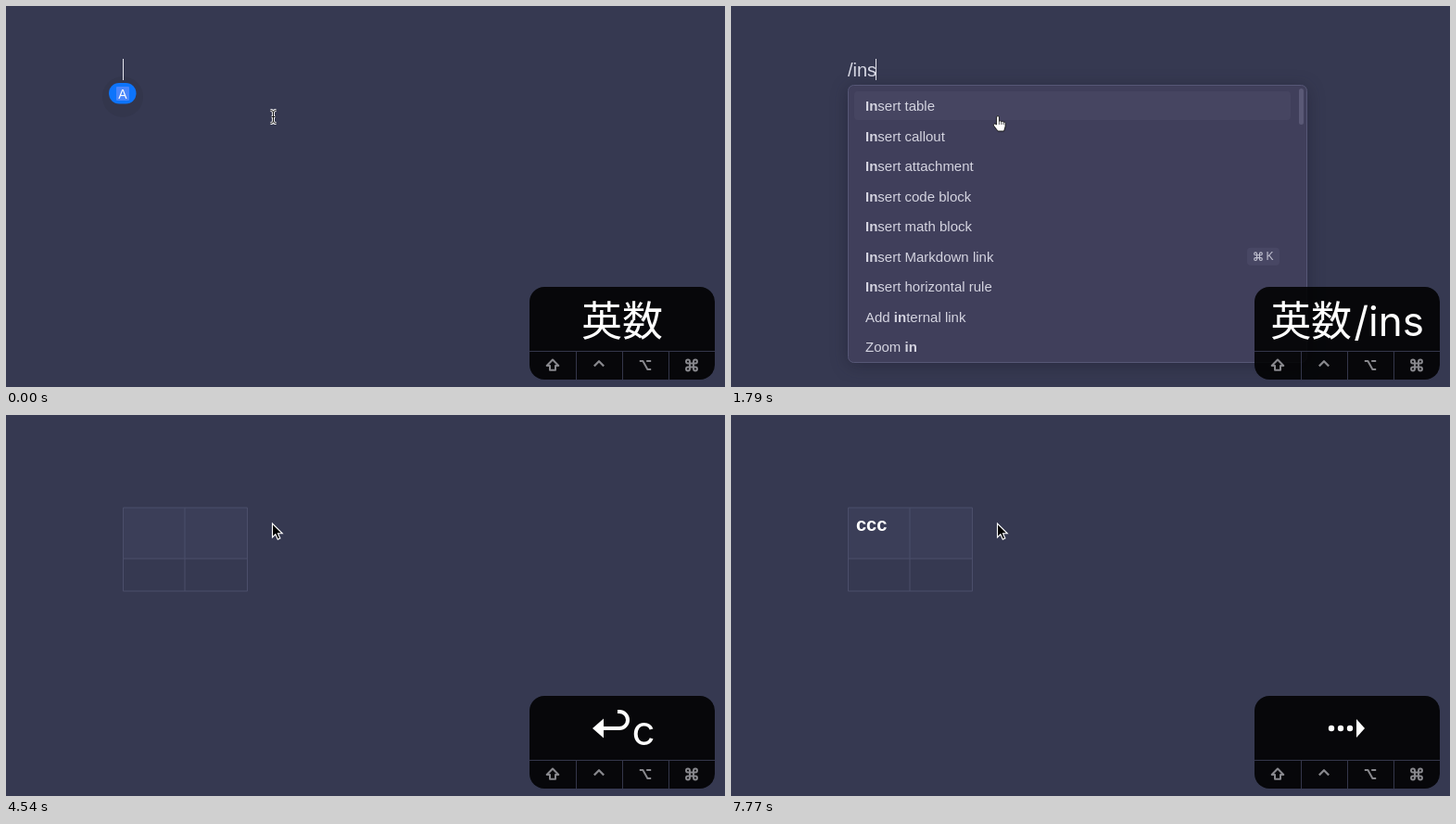
Write an HTML page that moves like this. It is 776 by 411 pixels and loops after 8000 ms.

```html
<!DOCTYPE html>
<html lang="en">
<head>
<meta charset="utf-8">
<title>Slash command menu</title>
<style>
  html, body { margin: 0; width: 100%; height: 100%; overflow: hidden; background: #363951; }
  svg { display: block; width: 100vw; height: 100vh; }
  text { font-family: "Liberation Sans", Arial, sans-serif; white-space: pre; }
  .editor { font-size: 20px; fill: #d9dae6; }
  .head { font-size: 20px; font-weight: 700; fill: #fff; }
  .item { font-size: 15px; fill: #d4d4e0; }
  .item tspan { font-weight: 700; }
  .hotkey { font-size: 12px; fill: #c3c3d2; }
  .keys { font: 44px Inter, "Noto Sans CJK JP", "Noto Sans CJK", sans-serif; fill: #fff; }
  .panel { filter: drop-shadow(0 3px 9px rgba(20, 20, 40, .38)); }
  .line { fill: none; stroke-linejoin: round; }
</style>
</head>
<body>
<svg id="stage" viewBox="0 0 776 411"></svg>
<script>
const LOOP = 8000;
const stage = document.getElementById('stage');

const ICON = {
  shift: 'M0-6.5L6.3 0H3V4.8H-3V0H-6.3Z',
  control: 'M-5.2 1L0-4.2 5.2 1',
  option: 'M-6.2-4.5H-2.6L2.4 4.5H6.2M1.2-4.5H6.2',
  command: 'M-2-2V-4a2 2 0 1 0-2 2H4a2 2 0 1 0-2-2V4a2 2 0 1 0 2-2H-4a2 2 0 1 0 2 2z',
  pin: 'M-4.2-6.5H4.2M-2.6-6.5V-1.4L-5 2.5H5L2.6-1.4V-6.5M0 2.5V7',
  beam: 'M-3-7Q0-7 0-4.5V4.5Q0 7-3 7M3-7Q0-7 0-4.5M0 4.5Q0 7 3 7M-1.8 0H1.8',
  hand: 'M4.6 10V2a1.4 1.4 0 0 1 2.8 0V6.5a1.3 1.3 0 0 1 2.4.4 1.3 1.3 0 0 1 2.3.6 1.2 1.2 0 0 1 2 1V12L12.6 17H6L1.5 11a1.3 1.3 0 0 1 2-1.6z',
  arrow: 'M0 0V15L3.4 11.8 5.8 17.2 8.4 16 6 10.8H10.8z'
};

const allItems = ['Export to PDF...', 'Templater: Open Insert Template modal', 'Templates: Insert template',
  'Git: Stage current file', 'Git: Commit staged with specific message', 'Templates: Insert current time',
  'Add cursor above', 'Add cursor below', 'Add embed'];
const inserts = ['table', 'callout', 'attachment', 'code block', 'math block', 'Markdown link', 'horizontal rule']
  .map(name => 'Insert ' + name);
const loose = [...inserts, 'Add internal link', 'Zoom in'];
const strict = [...inserts, 'Templates: Insert template', 'Templates: Insert current time'];

const MENU = {
  all: { query: '', right: 626, items: allItems, pins: [0, 1, 2, 3, 4, 5], hotkey: [1, 'option', 'E'] },
  i: { query: 'i', right: 619, items: loose, pins: [], hotkey: [5, 'command', 'K'] },
  in: { query: 'in', right: 622, items: loose, pins: [], hotkey: [5, 'command', 'K'] },
  ins: { query: 'ins', right: 626, items: strict, pins: [7, 8], hotkey: [5, 'command', 'K'] }
};

// Each step changes part of the state; caret is [x, top] or null.
const TIMELINE = [
  [0, { text: '', caret: [126, 57], badge: true, keys: '英数', pointer: 'beam', menu: null, table: null, ctrl: false }],
  [120, { badge: false }],
  [360, { caret: null }],
  [600, { text: '/', caret: [131, 57], keys: '英数/' }],
  [720, { menu: 'all', pointer: 'hand' }],
  [1080, { caret: null }],
  [1440, { text: '/i', caret: [136, 57], keys: '英数/i' }],
  [1560, { text: '/in', caret: [146.6, 57], keys: '英数/in', menu: 'i' }],
  [1670, { menu: 'in' }],
  [1790, { text: '/ins', caret: [156, 57], keys: '英数/ins' }],
  [1910, { menu: 'ins' }],
  [2270, { caret: null }],
  [2390, { keys: '', ctrl: true }],
  [2630, { keys: '↩', ctrl: false }],
  [2750, { text: '', menu: null, table: '', caret: [135, 106], pointer: 'arrow' }],
  [3230, { caret: null }],
  [3710, { caret: [135, 106] }],
  [4190, { caret: null }],
  [4540, { keys: '↩c' }],
  [4660, { table: 'c', caret: [146, 106] }],
  [4780, { table: 'cc', caret: [157, 106], keys: '↩cc' }],
  [5020, { table: 'ccc', caret: [168, 106], keys: '↩ccc' }],
  [5380, { keys: '', ctrl: true }],
  [5490, { caret: null }],
  [5970, { caret: [168, 106] }],
  [6090, { keys: '⇥', ctrl: false }],
  [6210, { caret: [201.5, 106] }],
  [6690, { caret: null }],
  [7170, { caret: [201.5, 106] }],
  [7770, { caret: null }]
];

const rect = (x, y, w, h, fill, more = '') =>
  `<rect x="${x}" y="${y}" width="${w}" height="${h}" fill="${fill}" ${more}/>`;
const text = (x, y, kind, body, more = '') => `<text x="${x}" y="${y}" class="${kind}" ${more}>${body}</text>`;
const icon = (name, x, y, color, width, scale = 1) =>
  `<path class="line" d="${ICON[name]}" transform="translate(${x} ${y}) scale(${scale})" stroke="${color}" stroke-width="${width}"/>`;
const solid = (name, x, y, fill, stroke, width) =>
  `<path d="${ICON[name]}" transform="translate(${x} ${y})" fill="${fill}" stroke="${stroke}" stroke-width="${width}"/>`;

function drawBadge() {
  return '<circle cx="126" cy="98" r="22" fill="#33364c"/>' +
    rect(111, 83, 29.5, 22.5, '#0d74fb', 'rx="11.2"') +
    rect(119, 87, 14, 15, '#4a86fb', 'rx="1"') +
    text(126, 99.5, '', 'A', 'text-anchor="middle" font-size="14" fill="#fff"');
}

function drawTable(word) {
  return rect(126.5, 100, 134, 55, '#3b3e58') +
    '<path d="M126.5 100H260.5V190H126.5ZM126.5 155H260.5M193 100V190" fill="none" stroke="#4b4e6a"/>' +
    text(135, 125, 'head', word);
}

function drawMenu({ query, right, items, pins, hotkey }) {
  const mark = label => query ? label.replace(new RegExp(query, 'i'), '<tspan>$&</tspan>') : label;
  const middle = row => 107.7 + 32.5 * row;
  const [keyRow, keyIcon, letter] = hotkey;
  const keyLeft = right - (pins.includes(keyRow) ? 97 : 65), keyY = middle(keyRow);
  return rect(126.5, 85.5, right - 127, 299, '#403f5b', 'rx="6" stroke="#565776" class="panel"') +
    rect(133, 92, right - 151, 31, '#464561', 'rx="4"') +
    rect(right - 9, 89, 5, 39, '#5a5976', 'rx="2.5"') +
    items.map((label, row) => text(145, middle(row) + 5.3, 'item', mark(label))).join('') +
    pins.map(row => icon('pin', right - 42, middle(row) - .5, '#a1a1b8', 1.3)).join('') +
    rect(keyLeft, keyY - 9.5, 35, 19, '#484764', 'rx="4"') +
    icon(keyIcon, keyLeft + 12, keyY, '#c3c3d2', 1.5, .72) +
    text(keyLeft + 20.5, keyY + 4.2, 'hotkey', letter);
}

function drawKeys(keys) {
  if (keys[0] === '↩') {
    const tail = keys.slice(1), x = 645 - 12 * tail.length;
    return `<g transform="translate(${x} 318)"><path d="M0 20L12 9.5V30.5Z" fill="#fff"/>` +
      '<path d="M10 20H29a9 9 0 0 0 0-18H27" fill="none" stroke="#fff" stroke-width="4"/></g>' +
      text(x + 42.5, 356, 'keys', tail);
  }
  if (keys === '⇥')
    return [648, 658, 668].map(x => `<circle cx="${x}" cy="338" r="3.2" fill="#fff"/>`).join('') +
      '<path d="M675 328L684 338 675 348Z" fill="#fff"/>';
  return text(665, 356, 'keys', keys.replace('/', '<tspan dx="2">/</tspan>'), 'text-anchor="middle"');
}

function drawCaster(keys, ctrl) {
  const dim = '#88888d';
  return rect(565, 303, 200, 100, '#000', 'rx="16" fill-opacity=".88"') +
    '<path d="M565 372.5H765M615.5 373V403M665.5 373V403M715.5 373V403" stroke="#34364a"/>' +
    drawKeys(keys) +
    icon('shift', 590, 388, dim, 2) +
    icon('control', 640, 387.5, ctrl ? '#fff' : dim, ctrl ? 2.8 : 2.3) +
    icon('option', 690, 387.5, dim, 2) +
    icon('command', 740, 387.5, dim, 1.9);
}

function drawPointer(kind) {
  if (kind === 'beam') return icon('beam', 288.5, 119.5, '#fff', 2.8) + icon('beam', 288.5, 119.5, '#111', 1);
  if (kind === 'arrow') return solid('arrow', 287.5, 117, '#000', '#fff', 1.1);
  return solid('hand', 282, 118, '#fff', '#111', .9) +
    '<path d="M289.4 124.5V128M291.8 125V128M294.1 126V128" stroke="#111" stroke-width=".7"/>';
}

function draw(s) {
  stage.innerHTML = rect(0, 0, 776, 411, '#363951') +
    (s.badge ? drawBadge() : '') +
    (s.table !== null ? drawTable(s.table) : '') +
    text(126, 75.5, 'editor', s.text) +
    (s.caret ? rect(...s.caret, 1, 23, '#e6e6ee') : '') +
    (s.menu ? drawMenu(MENU[s.menu]) : '') +
    drawPointer(s.pointer) +
    drawCaster(s.keys, s.ctrl);
}

const start = performance.now();
let shown = -1;
function tick() {
  const now = (performance.now() - start) % LOOP;
  const past = TIMELINE.filter(([at]) => at <= now);
  if (past.length !== shown) {
    shown = past.length;
    draw(Object.assign({}, ...past.map(step => step[1])));
  }
  requestAnimationFrame(tick);
}
tick();
</script>
</body>
</html>
```
